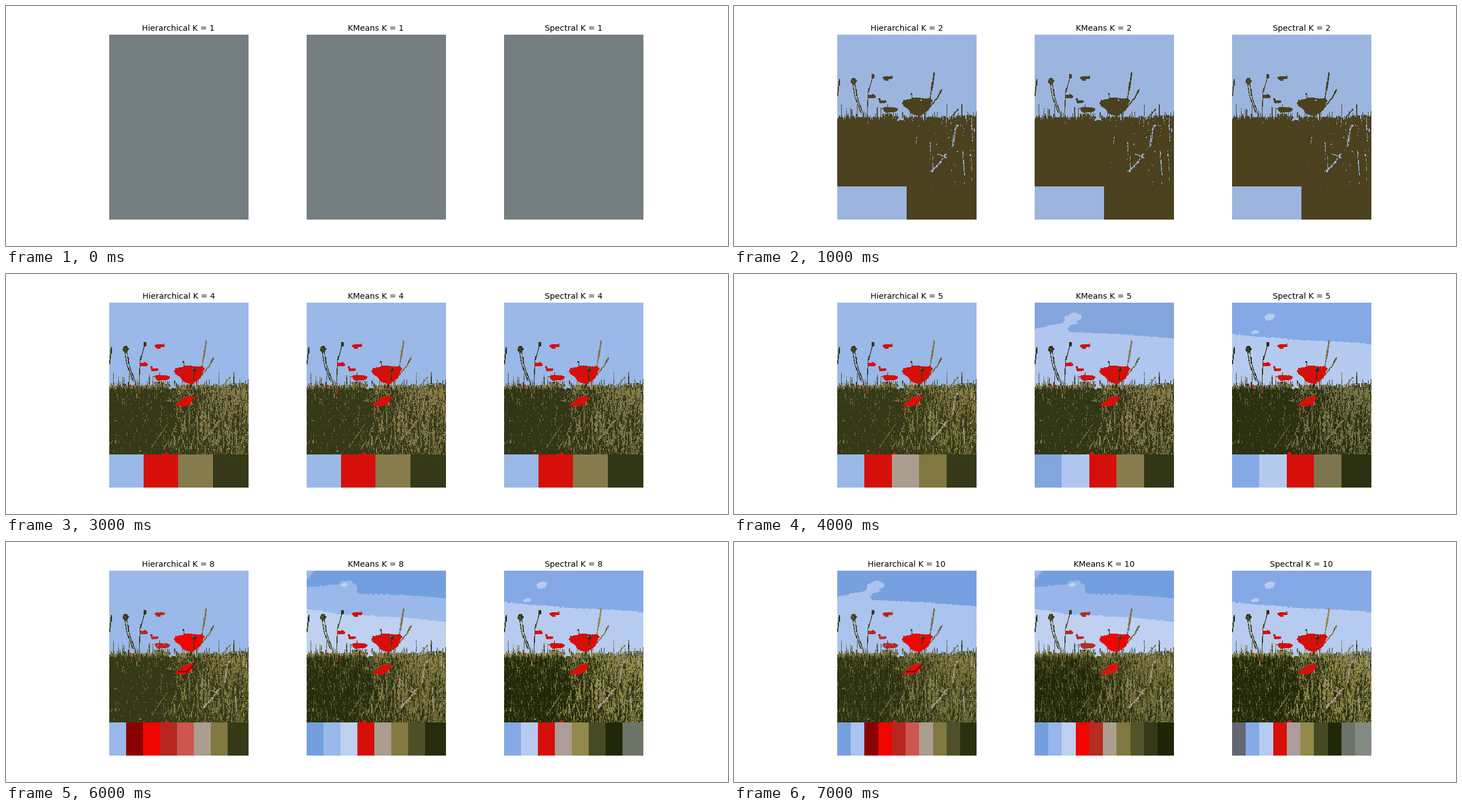
Recreate the animation shown at these times as a matplotlib script. Size 1280 by 427 pixels, loop 8 s.

```python
import numpy as np
import matplotlib.pyplot as plt
from matplotlib.animation import FuncAnimation
from matplotlib.colors import to_rgb
from matplotlib.path import Path

W, H, BAR = 214, 286, 51        # picture size in cells, height of the palette bar
CELL = 1.1487                   # stage pixels per cell
rng = np.random.default_rng(12)
shape = (H - BAR, W)
# Scene coordinates are the stage pixels of the left panel.
X, Y = np.meshgrid(183 + (np.arange(W) + 0.5) * CELL,
                   51.2 + (np.arange(H - BAR) + 0.5) * CELL)


def noise(ny, nx):
    a = rng.normal(size=shape)
    a = sum(np.roll(a, k, 0) for k in range(ny))
    a = sum(np.roll(a, k, 1) for k in range(nx))
    return a / a.std()


def poly(pts, rough=0.5):
    jx, jy = rough * noise(3, 3), rough * noise(3, 3)
    cells = np.c_[(X + jx).ravel(), (Y + jy).ravel()]
    return Path(pts).contains_points(cells).reshape(shape)


def ellipse(cx, cy, rx, ry):
    return ((X - cx) / rx) ** 2 + ((Y - cy) / ry) ** 2 < 1


def line(pts, width):
    mask = np.zeros(shape, bool)
    for (x0, y0), (x1, y1) in zip(pts, pts[1:]):
        dx, dy = x1 - x0, y1 - y0
        t = np.clip(((X - x0) * dx + (Y - y0) * dy) / (dx * dx + dy * dy), 0, 1)
        mask |= np.hypot(X - x0 - t * dx, Y - y0 - t * dy) < width / 2
    return mask


def ramp(x, mid, soft):
    return 1 / (1 + np.exp(-(x - mid) / soft))


streak = 0.75 * noise(9, 1) + 0.5 * noise(3, 1) + 0.45 * noise(1, 1)
blotch = noise(3, 2)
grain = noise(2, 1)

# Field: ragged skyline and brightness of the grass
rise = 2 * rng.normal(size=W)
spikes = rng.random(W) < 0.33
rise[spikes] += rng.exponential(7, spikes.sum())
rise += 4 * np.exp(-((X[0] - 278) / 18) ** 2) + 3 * ramp(X[0], 390, 10)
grass = Y > 198 - np.clip(rise, -5, 23)
base = (0.31 + 0.27 * np.exp(-((Y - 196) / 8) ** 2)
        + 0.07 * np.exp(-((Y - 205) / 25) ** 2)
        + 0.1 * ramp(X, 290, 10) + 0.11 * ramp(X, 345, 12))
base = np.where(Y < 196, 0.55, np.minimum(base, 0.6))
tone = base + 0.125 * streak


def draw(mask, level):
    grass[mask] = True
    tone[mask] = level + 0.06 * streak[mask]


# Thin random blades, denser to the right
for _ in range(60):
    x, y = 275 + 152 * rng.random() ** 0.7, rng.uniform(200, 300)
    lean, size = rng.normal(0, 7), rng.uniform(10, 32)
    draw(line([(x, y), (x + lean, min(y + size, 320))], 1.4), 0.64)
draw(line([(285, 268), (258, 308)], 1.3), 0.6)

# Bright stalks
for pts, width in [
    ([(395, 212), (391, 220), (387, 250)], 3.2),
    ([(375, 263), (364, 279), (350, 294)], 3),
    ([(360, 263), (376, 270)], 2),
    ([(347, 243), (348, 268)], 1.8),
    ([(327, 210), (325, 226), (321, 245)], 1.6),
    ([(404, 258), (408, 300)], 2),
    ([(420, 202), (422, 240)], 1.6),
    ([(418, 255), (420, 292)], 1.6),
    ([(351, 268), (352, 292)], 1.6),
]:
    draw(line(pts, width) & (grain > -0.9), 0.88)

# Stems, buds and ears against the sky
for pts, width, level in [
    ([(187, 132), (184, 160)], 2.2, 0.42),
    ([(210, 138), (214, 160), (225, 190)], 1.6, 0.42),
    ([(215, 140), (218, 162), (230, 196)], 1.6, 0.45),
    ([(246, 126), (238, 152), (236, 195)], 1.6, 0.42),
    ([(354, 119), (350, 146)], 3, 0.64),
    ([(350, 146), (344, 182)], 1.8, 0.6),
    ([(367, 149), (360, 163), (343, 184)], 2.2, 0.6),
    ([(314, 155), (315, 166)], 1.8, 0.42),
    ([(396, 184), (386, 196)], 1.8, 0.6),
    ([(326, 194), (328, 212)], 1.8, 0.4),
]:
    draw(line(pts, width), level)
draw(ellipse(212.5, 134, 5.5, 6) & (grain > -1.6), 0.42)
draw(ellipse(246, 125, 2.6, 4), 0.44)

# Poppies: shade 0 dark, 1 bright, 2 middle, 3 pale
red = np.zeros(shape, bool)
shade = np.full(shape, 2)
shade[blotch > 1.4] = 3
shade[blotch < -1.7] = 0
petals = [
    [(263, 128), (268, 125), (280, 125), (282, 128), (277, 131), (270, 133), (266, 131)],
    [(237, 159), (245, 156), (253, 160), (247, 164), (238, 164)],
    [(256, 164), (261, 168), (268, 168), (270, 172), (257, 173)],
    [(261, 183), (270, 179), (285, 181), (293, 183), (286, 188), (276, 189), (268, 190)],
    [(279, 322), (283, 315), (288, 322)],
]
for pts in petals:
    red |= poly(pts)
red |= ellipse(237, 210, 1.8, 1.6) | ellipse(220, 199, 1.8, 1.8)
lower = poly([(299, 232), (310, 225), (314, 220), (328, 216), (335, 219),
              (330, 224), (326, 231), (315, 236), (303, 236)])
big = poly([(297, 175), (299, 168), (312, 166), (317, 162), (333, 164), (347, 164),
            (351, 168), (347, 177), (343, 185), (336, 192), (326, 195), (314, 192),
            (306, 182)], 0.3)
shade[lower] = np.where(blotch[lower] > 0.9, 2, 1)
shade[lower & line([(306, 230), (320, 230), (332, 219)], 2.5)] = 0
shade[big] = np.where(blotch[big] > 1.8, 2, 1)
red |= lower | big
draw(red, 0.63)
draw(big & (abs(X - 324) < 21), 0.34)
pod = ellipse(333, 171, 2.8, 4) | line([(333, 172), (332, 190)], 1.6)
red &= ~pod
draw(pod, 0.42)
draw(ellipse(331, 168, 1.6, 1.4), 0.88)

daisy = poly([(286, 191), (292, 195), (296, 191), (298, 199), (303, 205), (295, 202),
              (288, 204), (291, 198)])

# Sky bands
bottom = [(430, 330), (180, 330)]
cloud_bank = poly([(180, 99), (198, 94), (215, 91), (230, 88), (237, 83), (235, 77),
                   (243, 72), (254, 69), (265, 72), (266, 79), (256, 85), (262, 88),
                   (248, 91), (240, 97), (244, 103), (300, 106), (350, 108),
                   (430, 115)] + bottom)
low_haze = (poly([(180, 107), (250, 113), (300, 117), (380, 121), (430, 125)] + bottom)
            | poly([(239, 78), (247, 71), (258, 70), (259, 76), (253, 83), (243, 83)])
            | poly([(216, 103), (225, 100), (231, 102), (227, 108), (220, 107)]))
deep = poly([(198, 50), (430, 50), (430, 101), (390, 97), (350, 94), (272, 92), (271, 78),
             (260, 68), (246, 69), (238, 76), (215, 78), (180, 80), (180, 71)])
pale = (poly([(180, 119), (210, 122), (240, 129), (300, 131), (350, 134), (390, 138),
              (430, 142)] + bottom)
        | poly([(242, 77), (250, 72), (257, 75), (250, 80)]))
fringe = np.zeros(shape, bool)
for dy, dx in [(0, 1), (0, -1), (1, 0)]:
    fringe |= np.roll(grass, (dy, dx), (0, 1))
fringe &= (grain > 0.5) & (Y > 115) & (X > 250)
grey = (grain + blotch > 2.9 - 2.6 * np.exp(-((Y - 200) / 11) ** 2) * ramp(X, 355, 20)) \
    & (Y > 183) & (Y < 260) & (X > 270)

CUTS = {1: [], 2: [0.55], 3: [0.82, 0.55], 4: [0.82, 0.55, 0.42],
        5: [0.82, 0.56, 0.45, 0.33]}
SHADES = {1: [0, 0, 0, 0], 2: [1, 0, 1, 1], 4: [0, 1, 2, 3]}


def sky_level(count, hazy):
    if count == 1:
        return np.zeros(shape, int)
    if count == 2:
        level = np.where(low_haze if hazy else cloud_bank, 1, 0)
    else:
        level = np.where(pale, 2, np.where(deep, 0, 1))
    return np.where(fringe & (not hazy), 0, level)


def render(roles, names, hazy):
    """Paint one clustering; roles: s sky, r red, v grass (light to dark), g grey."""
    colors = np.array([to_rgb("#" + n) for n in names.split()])
    k = len(colors)
    sky, reds, veg, greys = ([i for i, c in enumerate(roles) if c == r] for r in "srvg")
    bar = np.minimum(np.arange(W) // (W // k), k - 1)
    index = np.zeros(shape, int)
    if veg:
        index = np.array(sky)[sky_level(len(sky), hazy)]
        step = sum((tone < c).astype(int) for c in CUTS[len(veg)]) + np.zeros(shape, int)
        field = np.array(veg)[step]
        if len(veg) == 1:
            field[tone > 0.82] = sky[0]
        if greys:
            pick = np.clip((streak + 1.5).astype(int), 0, len(greys) - 1)
            field = np.where(grey, np.array(greys)[pick], field)
        index = np.where(grass, field, index)
        if reds:
            index[red] = np.array(reds)[np.array(SHADES[len(reds)])[shade[red]]]
        index[daisy] = sky[-1]
    return colors[np.vstack([index, np.tile(bar, (BAR, 1))])]


ONE = ("s", "757e80")
TWO = ("sv", "9bb5df 4b411e")
STEPS = [1, 2, 3, 4, 5, 6, 8, 10]
METHODS = {
    "Hierarchical": [
        ONE, TWO,
        ("srv", "9bb5df d60f0a 44461f"),
        ("srvv", "9ab8e8 d60f0a 857b4c 353917"),
        ("srvvv", "9ab8e8 d60f0a ab9e90 807840 353917"),
        ("srrvvv", "9ab8e8 f00500 b82620 ab9e90 807840 353917"),
        ("srrrrvvv", "9ab8e8 8b0000 f00500 b82620 cd5650 ab9e90 807840 353917"),
        ("ssrrrrvvvv", "76a0df abc4ee 8b0000 f00500 b82620 cd5650 ab9e90 807840 "
                       "4d5029 2b3011"),
    ],
    "KMeans": [
        ONE, TWO,
        ("svv", "9ab6e7 946c44 353917"),
        ("srvv", "9ab8e8 d60f0a 887c4c 353917"),
        ("ssrvv", "82a5dc b0c6ef d60f0a 887c4c 313616"),
        ("ssrvvv", "82a5dc b0c6ef d60f0a ab9e90 7f7840 313616"),
        ("sssrvvvv", "749fde 9ab8ea bfd0f1 d60f0a ab9e90 857a42 4d5027 262c0d"),
        ("sssrrvvvvv", "749fde 98b6ea bfd0f1 f00500 b82a24 ab9e90 807840 525429 "
                       "353917 1e2408"),
    ],
    "Spectral": [
        ONE, TWO,
        ("svv", "9ab6e7 8f6c44 313616"),
        ("srvv", "9ab8e8 d60f0a 857b4c 313616"),
        ("ssrvv", "84a9e6 b5caef d60f0a 7c754d 2b3011"),
        ("ssrvvv", "84a9e6 b5caef d60f0a ae9c9a 7c7545 2b3011"),
        ("ssrvvvvg", "84a9e6 b7cbf0 d60f0a ae9c9a 928a4a 474b23 212709 6b7468"),
        ("gssrvvvvgg", "646770 84a9e6 b7cbf0 d60f0a ae9c9a 928a48 474b23 212709 "
                       "6b7468 848b82"),
    ],
}

# The small surplus keeps the height from rounding down to 426 pixels.
fig, axes = plt.subplots(1, 3, figsize=(12.8001, 4.2701), dpi=100)
panels = []
for ax, (name, specs) in zip(axes, METHODS.items()):
    pictures = [render(roles, names, name == "Spectral") for roles, names in specs]
    view = ax.imshow(pictures[0], interpolation="nearest")
    title = ax.set_title("", fontsize=10.24, pad=5.12, family="DejaVu Sans")
    ax.axis("off")
    panels.append((name, pictures, view, title))


def update(frame):
    for name, pictures, view, title in panels:
        view.set_data(pictures[frame])
        title.set_text(f"{name} K = {STEPS[frame]}")
    return []


anim = FuncAnimation(fig, update, frames=len(STEPS), interval=1000, repeat=True,
                     repeat_delay=0)
plt.show()
```
